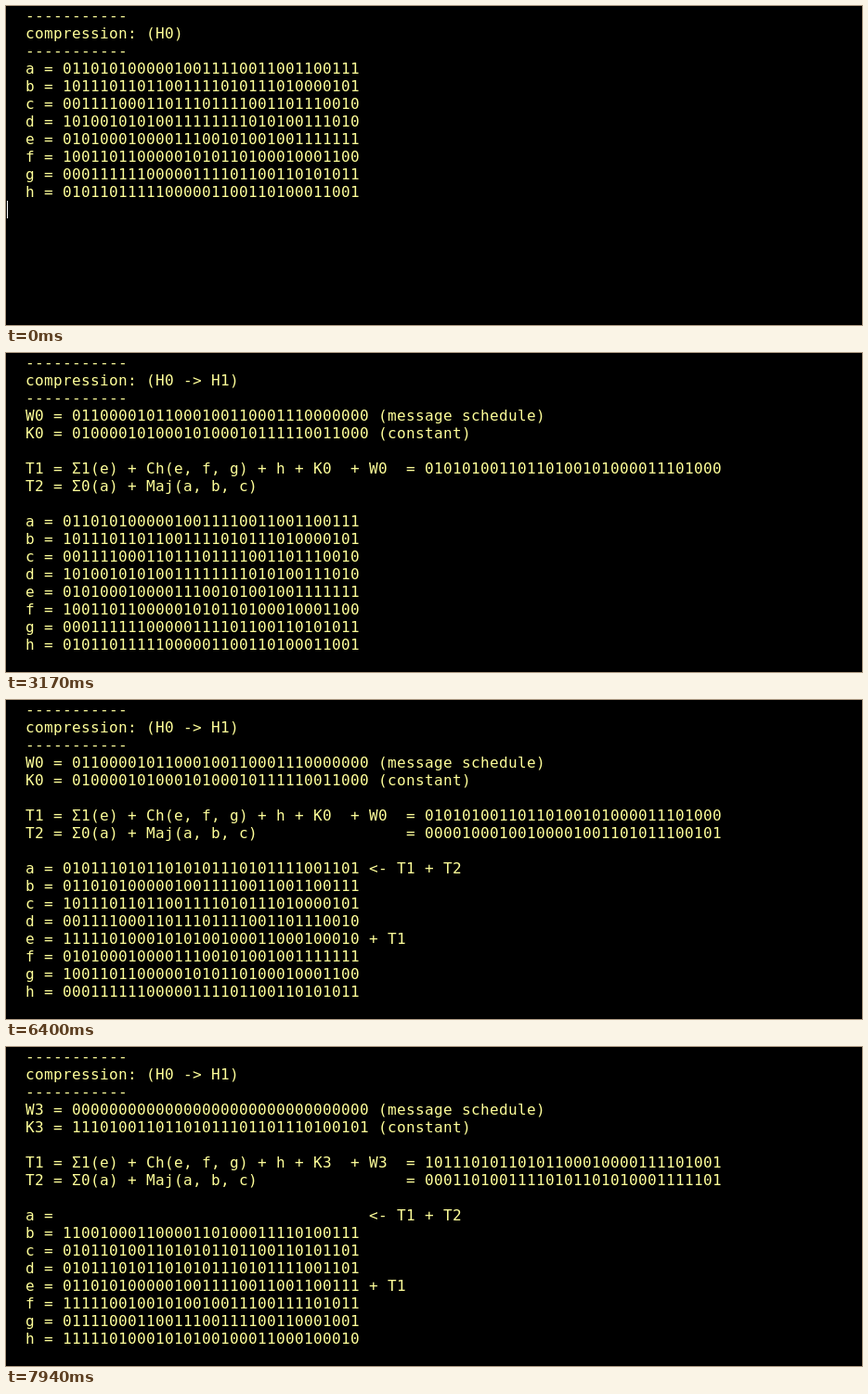
Animation, 922 px wide and 344 px high, one loop 8 s. Source, as an HTML page:

```html
<!DOCTYPE html>
<html lang="en">
<head>
<meta charset="utf-8">
<title>SHA-256 compression</title>
<style>
  html, body { margin: 0; width: 100%; height: 100%; overflow: hidden; background: #000; }
  svg { display: block; }
  text {
    font: 16px "DejaVu Sans Mono", "Liberation Mono", monospace;
    fill: #ffff99;
    white-space: pre;
  }
</style>
</head>
<body>
<svg id="stage" width="922" height="344" viewBox="0 0 922 344">
  <rect width="922" height="344" fill="#000"/>
  <rect id="cursor" x="1" width="1" height="19" fill="#fff"/>
</svg>
<script>
const LOOP = 8000, CELL = 10, LINE = 19, ROWS = 17, COLS = 80;
const H = [0x6a09e667, 0xbb67ae85, 0x3c6ef372, 0xa54ff53a, 0x510e527f, 0x9b05688c, 0x1f83d9ab, 0x5be0cd19];
const K = [0x428a2f98, 0x71374491, 0xb5c0fbcf, 0xe9b5dba5];
const W = [0x61626380, 0, 0, 0]; // padded message "abc"

const bits = n => (n >>> 0).toString(2).padStart(32, "0");
const rotr = (x, n) => (x >>> n) | (x << (32 - n));
const sigma = (x, i, j, k) => rotr(x, i) ^ rotr(x, j) ^ rotr(x, k);

// Each round: registers before, sums, registers shifted, registers after
const rounds = [];
let state = H;
K.forEach((k, i) => {
  const [a, b, c, d, e, f, g, h] = state;
  const t1 = (sigma(e, 6, 11, 25) + ((e & f) ^ (~e & g)) + h + k + W[i]) | 0;
  const t2 = (sigma(a, 2, 13, 22) + ((a & b) ^ (a & c) ^ (b & c))) | 0;
  const shifted = [null, a, b, c, d, e, f, g];
  const after = [t1 + t2, a, b, c, d + t1, e, f, g];
  rounds.push({ before: state, t1, t2, shifted, after });
  state = after;
});

// Later rounds run fast: [time, round, stage of the registers]
const fast = [
  [7200, 1, "before"], [7310, 1, "shifted"], [7430, 1, "after"],
  [7540, 2, "before"], [7640, 2, "shifted"], [7740, 2, "after"],
  [7840, 3, "before"], [7940, 3, "shifted"]
];

function registers(t, step) {
  if (step) return rounds[step[1]][step[2]];
  const { before, shifted, after } = rounds[0];
  if (t < 4800) return before;
  if (t < 5600) return shifted;
  if (t < 6400) return [after[0], ...shifted.slice(1)];
  return after;
}

function note(t, i) {
  if (t >= 4400 && t < 4800 && i < 7) return " ↓";
  if (t >= 4800 && t < 5200 && i > 0) return " ↓";
  if (t >= 5200 && i === 0) return " <- T1 + T2";
  if (t >= 6000 && i === 4) return " + T1";
  return "";
}

function screen(t) {
  const step = fast.filter(s => t >= s[0]).pop();
  const n = step ? step[1] : 0;
  const { t1, t2 } = rounds[n];
  const dashes = "-".repeat(11);
  const lines = Array(ROWS).fill("");
  lines[0] = lines[2] = dashes;
  lines[1] = `compression: (H0${t < 400 ? "" : " -> H1"})`;

  const sum = (formula, value, shown) =>
    shown ? formula.padEnd(41) + "= " + bits(value) : formula;
  if (t >= 1170) lines[3] = `W${n} = ${bits(W[n])} (message schedule)`;
  if (t >= 1570) lines[4] = `K${n} = ${bits(K[n])} (constant)`;
  if (t >= 2370) lines[6] = sum(`T1 = Σ1(e) + Ch(e, f, g) + h + K${n}  + W${n}`, t1, t >= 2770);
  if (t >= 3170) lines[7] = sum("T2 = Σ0(a) + Maj(a, b, c)", t2, t >= 3570);

  const top = t < 770 ? 3 : 9;
  registers(t, step).forEach((value, i) => {
    const digits = value === null ? " ".repeat(32) : bits(value);
    lines[top + i] = `${"abcdefgh"[i]} = ${digits}${note(t, i)}`;
  });
  return lines;
}

const svg = document.getElementById("stage");
const cursor = document.getElementById("cursor");
const columns = Array.from({ length: COLS }, (_, i) => 21 + i * CELL).join(" ");
const rows = Array.from({ length: ROWS }, (_, i) => {
  const row = document.createElementNS("http://www.w3.org/2000/svg", "text");
  row.setAttribute("x", columns);
  row.setAttribute("y", 16 + i * LINE);
  row.setAttribute("xml:space", "preserve");
  svg.insertBefore(row, cursor);
  return row;
});

function draw(t) {
  screen(t).forEach((line, i) => {
    if (rows[i].textContent !== line) rows[i].textContent = line;
  });
  const blink = Math.floor((t + 230) / 600);
  cursor.setAttribute("y", 1 + LINE * (t < 770 ? 11 : 17));
  cursor.setAttribute("visibility", blink % 2 ? "hidden" : "visible");
}

const start = performance.now();
function tick() {
  draw((performance.now() - start) % LOOP);
  requestAnimationFrame(tick);
}
draw(0);
requestAnimationFrame(tick);
</script>
</body>
</html>
```
